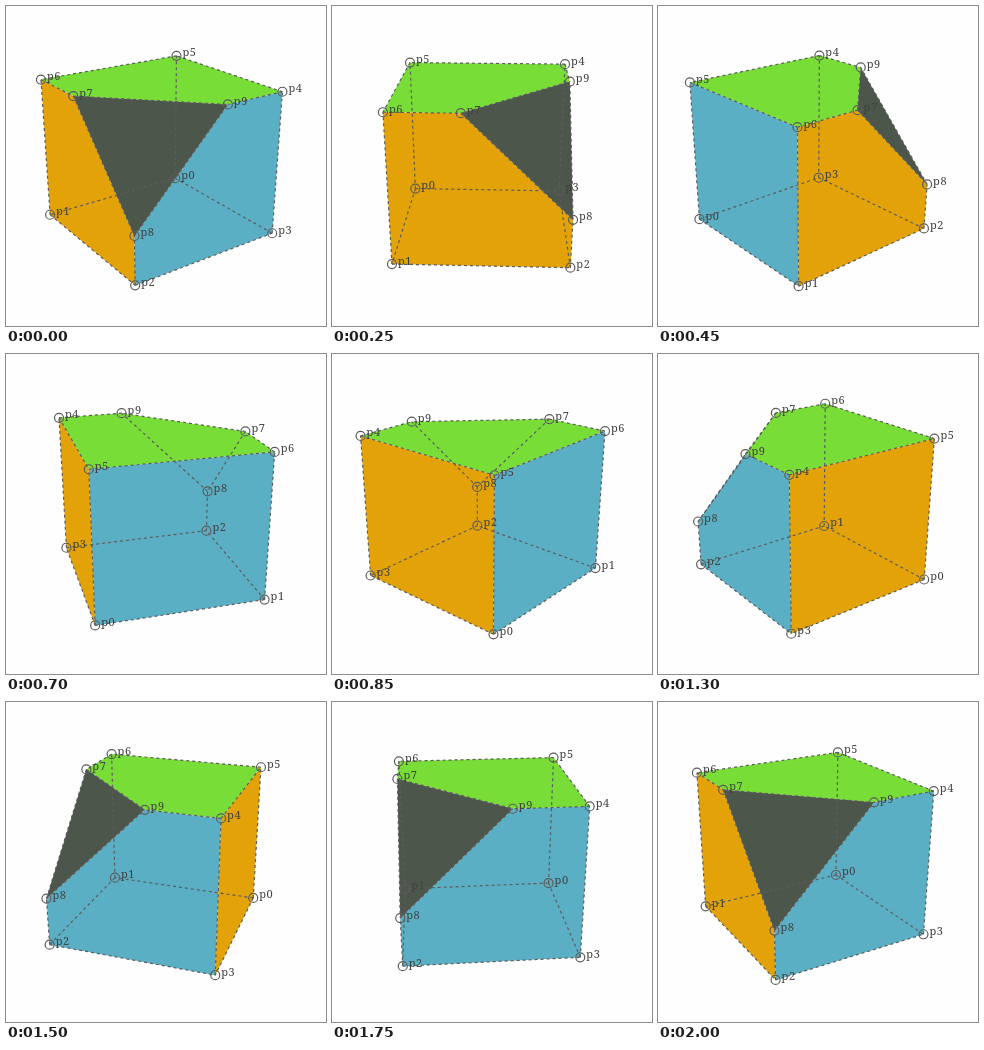
Write an HTML page with a canvas that moves like this. It is 320 px wide and 320 px high and loops after 2.05 s.

```html
<!DOCTYPE html>
<html lang="en">
<head>
<meta charset="utf-8">
<title>Rotating truncated box</title>
<style>
  html, body { margin: 0; width: 100%; height: 100%; overflow: hidden; background: #fefefe; }
  canvas { display: block; width: 320px; height: 320px; }
</style>
</head>
<body>
<canvas id="stage" width="320" height="320"></canvas>
<script>
const ctx = document.getElementById('stage').getContext('2d');
const LOOP = 2050, STEP = 50, RAD = Math.PI / 180;

// Camera: screen centre, focal length, distance and downward tilt
const CX = 152.2, CY = 151.5, DIST = 8.24, FOCAL = 83 * DIST;
const SIN = Math.sin(22.5 * RAD), COS = Math.cos(22.5 * RAD);

// Box with one corner cut off: [x, height, z]
const H = 0.9;
const points = [
  [-1, -H, -1], [-1, -H, 1], [1, -H, 1], [1, -H, -1],
  [1, H, -1], [-1, H, -1], [-1, H, 1],
  [-0.2, H, 1], [1, -0.3, 1], [1, H, -0.2]
];

const GREEN = '#78dd37', BLUE = '#5bafc4', ORANGE = '#e2a208', DARK = '#4d564b';
const faces = [
  [GREEN, [5, 6, 7, 9, 4]],
  [BLUE, [0, 1, 6, 5]],
  [ORANGE, [1, 2, 8, 7, 6]],
  [BLUE, [2, 3, 4, 9, 8]],
  [ORANGE, [3, 0, 5, 4]],
  [DARK, [7, 8, 9]],
  [DARK, [3, 2, 1, 0]]
];

// Turning speed varies: [step, angle in degrees]
const turn = [[0, 170], [9, 265], [14, 331], [20, 397], [26, 441.8],
              [30, 475.9], [40, 524.8], [41, 530]];

function angleAt(step) {
  const i = turn.findIndex(k => k[0] > step);
  const [s0, a0] = turn[i - 1], [s1, a1] = turn[i];
  return a0 + (a1 - a0) * (step - s0) / (s1 - s0);
}

function project([x, y, z], angle) {
  // the first corner points at the viewer when angle is 0
  const a = (angle - 225) * RAD;
  const rx = x * Math.cos(a) + z * Math.sin(a);
  const rz = z * Math.cos(a) - x * Math.sin(a);
  const scale = FOCAL / (DIST - y * SIN - rz * COS);
  return [CX + rx * scale, CY - (y * COS - rz * SIN) * scale];
}

function facesViewer(poly) {
  let area = 0;
  poly.forEach(([x, y], i) => {
    const [nx, ny] = poly[(i + 1) % poly.length];
    area += x * ny - nx * y;
  });
  return area < 0;
}

function draw(step) {
  const pts = points.map(p => project(p, angleAt(step)));
  ctx.fillStyle = '#fefefe';
  ctx.fillRect(0, 0, 320, 320);

  for (const [color, ids] of faces) {
    const poly = ids.map(i => pts[i]);
    if (!facesViewer(poly)) continue;
    ctx.beginPath();
    poly.forEach(p => ctx.lineTo(...p));
    ctx.fillStyle = color;
    ctx.fill();
  }

  ctx.strokeStyle = '#5c5c5c';
  ctx.lineWidth = 1.2;
  ctx.setLineDash([3, 3]);
  for (const [, ids] of faces) {
    ids.forEach((a, i) => {
      const b = ids[(i + 1) % ids.length];
      if (a > b) return; // each edge is shared by two faces
      ctx.beginPath();
      ctx.moveTo(...pts[a]);
      ctx.lineTo(...pts[b]);
      ctx.stroke();
    });
  }

  ctx.setLineDash([]);
  ctx.font = '11px "Noto Serif", serif';
  ctx.letterSpacing = '0.6px';
  ctx.fillStyle = '#404040';
  pts.forEach(([x, y], i) => {
    ctx.beginPath();
    ctx.arc(x, y, 4.5, 0, 2 * Math.PI);
    ctx.stroke();
    ctx.fillText('p' + i, x + 6, y + 0.5);
  });
}

const start = performance.now();
function tick() {
  draw(Math.floor((performance.now() - start) % LOOP / STEP));
  requestAnimationFrame(tick);
}
tick();
</script>
</body>
</html>
```
